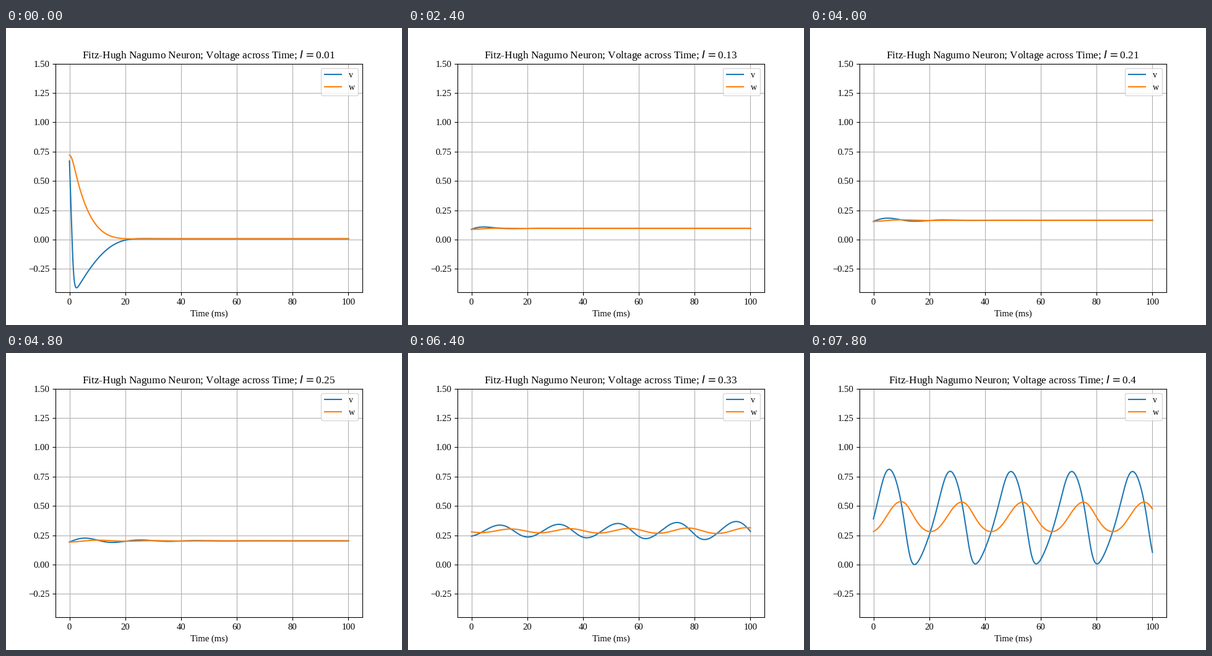
Recreate the animation shown at these times as a matplotlib script. Size 640x480 px, loop 8000 ms.

```python
import numpy as np
import matplotlib.pyplot as plt
from matplotlib.animation import FuncAnimation

FRAMES = 40
A, EPS = 0.5, 0.1
DT, T_END = 0.1, 100
START = (0.67, 0.72)

plt.rcParams["font.family"] = "Liberation Serif"


def slope(v, w, current):
    return v * (v - A) * (1 - v) - w + current, EPS * (v - w)


def rk4_step(v, w, current):
    a1, b1 = slope(v, w, current)
    a2, b2 = slope(v + DT / 2 * a1, w + DT / 2 * b1, current)
    a3, b3 = slope(v + DT / 2 * a2, w + DT / 2 * b2, current)
    a4, b4 = slope(v + DT * a3, w + DT * b3, current)
    return (v + DT / 6 * (a1 + 2 * a2 + 2 * a3 + a4),
            w + DT / 6 * (b1 + 2 * b2 + 2 * b3 + b4))


def solve(state, current, steps):
    path = [state]
    for _ in range(steps):
        path.append(rk4_step(*path[-1], current))
    return path


times = np.linspace(0, T_END, round(T_END / DT) + 1)
currents = [round(0.01 * (k + 1), 2) for k in range(FRAMES)]

# Each run starts where the run at the previous current ended.
runs = []
state = START
for current in currents:
    path = solve(state, current, len(times) - 1)
    runs.append(np.array(path))
    state = path[-1]

fig, ax = plt.subplots(figsize=(6.4, 4.8), dpi=100)
v_line, = ax.plot([], [], label="v")
w_line, = ax.plot([], [], label="w")
ax.set_xlim(-5, 105)
ax.set_ylim(-0.45, 1.5)
ax.set_yticks(np.arange(-0.25, 1.51, 0.25))
ax.tick_params(labelsize=10.6)
ax.set_xlabel("Time (ms)", fontsize=10.5)
ax.grid()
ax.legend(loc="upper right")
title = ax.set_title("", fontsize=12.4)


def draw(k):
    v_line.set_data(times, runs[k][:, 0])
    w_line.set_data(times, runs[k][:, 1])
    title.set_text("Fitz-Hugh Nagumo Neuron; Voltage across Time; "
                   f"$I=${currents[k]}")
    return v_line, w_line, title


anim = FuncAnimation(fig, draw, frames=FRAMES, interval=200,
                     repeat=True, repeat_delay=0)
plt.show()
```
